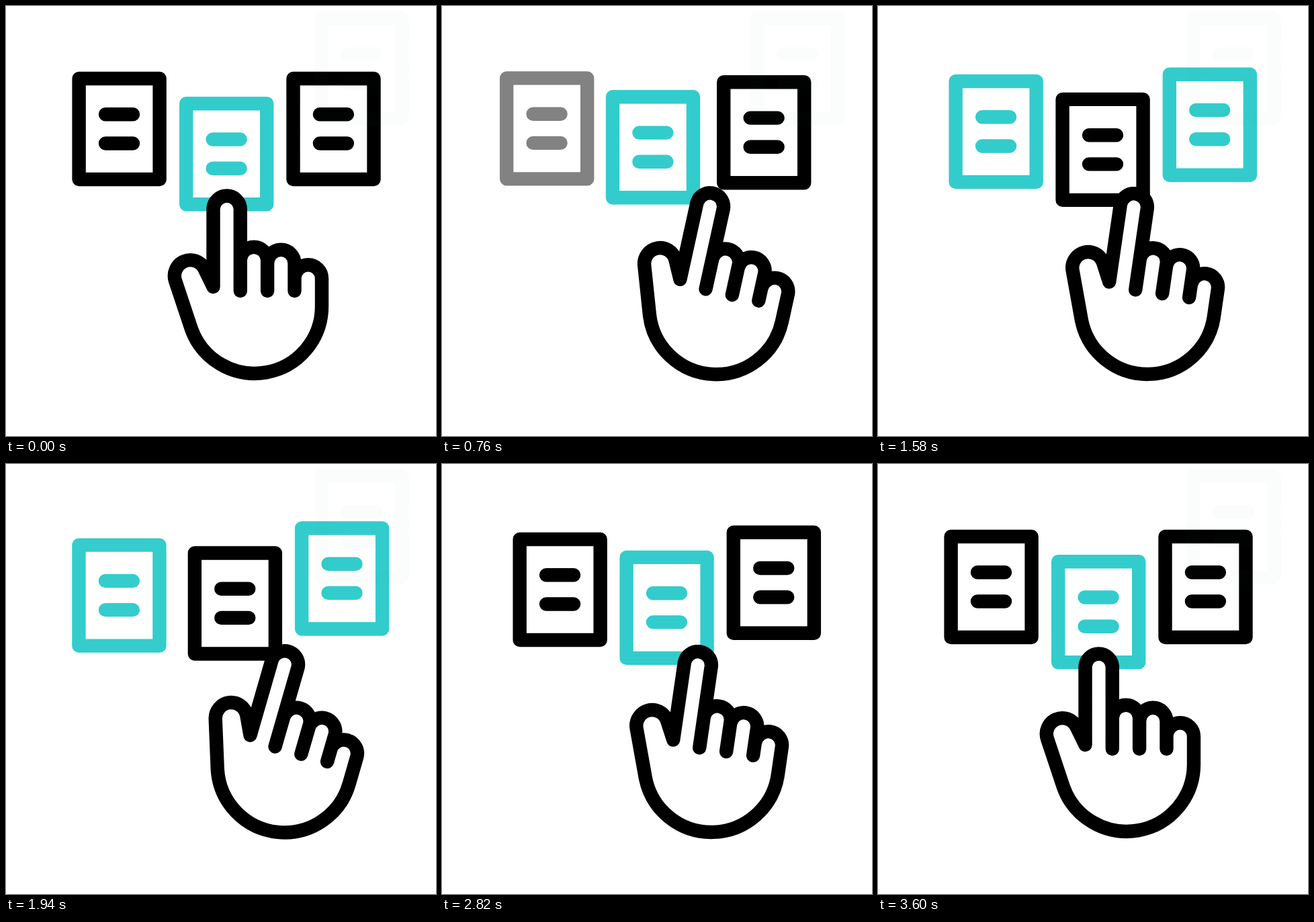
These frames come from a looping animation (640 by 640 pixels, 3620 ms). An HTML page:

```html
<!DOCTYPE html>
<html lang="en">
<head>
<meta charset="utf-8">
<title>Swipe through documents</title>
<style>
  html, body { margin: 0; width: 100%; height: 100%; overflow: hidden; background: #fff; }
  svg { display: block; width: 100%; height: 100%; }
  g, path { fill: none; stroke-width: 20.4; stroke-linecap: round; stroke-linejoin: round; }
  #hand { fill: #fff; stroke: #000; }
</style>
</head>
<body>
<svg viewBox="0 0 640 640">
  <defs>
    <path id="sheet" d="M10.2 10.2h120v150h-120zM49.6 63.5h41M49.6 106.7h41"/>
  </defs>
  <g id="docs"></g>
  <use id="trace" href="#sheet" x="459" y="8" stroke="#366" opacity=".02"/>
  <path id="hand" d="M348.8 424V301.3A20.2 20.2 0 0 0 308.5 301.3V418L295 390.5
    A23.5 23.5 0 0 0 252 409L276 481A100 100 0 0 0 470 447V405.5
    A20.2 20.2 0 0 0 429.5 405.5V424
    M429.5 424V383A20.2 20.2 0 0 0 389.1 383V424
    M389.1 424V377.5A20.2 20.2 0 0 0 348.8 377.5V424"/>
</svg>
<script>
const LOOP = 3620, RESET = 3600, SWIPE = 1240;
const COLORS = ['#000', '#33cccc'];

// Each sheet is pulled back along one curve, then slides along another.
const SHEETS = [
  { pull: [[459, 8]],
    slide: [[459, 8], [452.5, 68], [417.3, 97.8]] },
  { pull: [[98.4, 97.8], [112.5, 99.5], [98.4, 110.6]],
    slide: [[98.4, 110.6], [-4, 0]] },
  { pull: [[258, 135], [271, 122.2]],
    slide: [[271, 122.2], [196, 132], [121, 127], [98.4, 97.8]] },
  { pull: [[417.3, 97.8], [430.2, 85]],
    slide: [[430.2, 85], [372, 143], [314, 129], [258, 135]] }
];

const $ = id => document.getElementById(id);
const ramp = (t, from, to) => Math.min(1, Math.max(0, (t - from) / (to - from)));
const ease = (t, from, to) => {
  const s = ramp(t, from, to);
  return s * s * (3 - 2 * s);
};

function bezier(points, u) {
  while (points.length > 1) {
    points = points.slice(1).map((p, i) => p.map((v, k) => points[i][k] + (v - points[i][k]) * u));
  }
  return points[0];
}

const uses = SHEETS.map(() => {
  const use = document.createElementNS('http://www.w3.org/2000/svg', 'use');
  use.setAttribute('href', '#sheet');
  return $('docs').appendChild(use);
});

function draw(time) {
  let clock = time % LOOP;
  if (clock >= RESET) clock = 0;
  const cycle = Math.floor(clock / SWIPE);
  const t = clock % SWIPE;

  const pulled = ease(t, 0, 690);
  const slid = ease(t, 694, 1002);
  SHEETS.forEach(({ pull, slide }, i) => {
    const [x, y] = slid > 0 ? bezier(slide, slid) : bezier(pull, pulled);
    const opacity = i === 0 ? ramp(t, 840, 990) : i === 1 ? 1 - ramp(t, 700, 820) : 1;
    uses[i].setAttribute('transform', `translate(${x} ${y})`);
    uses[i].setAttribute('opacity', opacity);
    uses[i].setAttribute('stroke', COLORS[(cycle + (i % 2 ? 0 : 1)) % 2]);
  });
  $('trace').setAttribute('visibility', cycle < 2 ? 'visible' : 'hidden');

  const shift = 45.5 * (ease(t, 0, 548) - ease(t, 670, 1030));
  const angle = 16.4 * ease(t, 0, 680) - 25 * ease(t, 680, 1000) + 8.6 * ease(t, 1000, 1120);
  $('hand').setAttribute('transform',
    `translate(${shift} ${shift * 0.035}) rotate(${angle} 370 447)`);
}

function tick() {
  draw(performance.now());
  requestAnimationFrame(tick);
}
tick();
</script>
</body>
</html>
```
